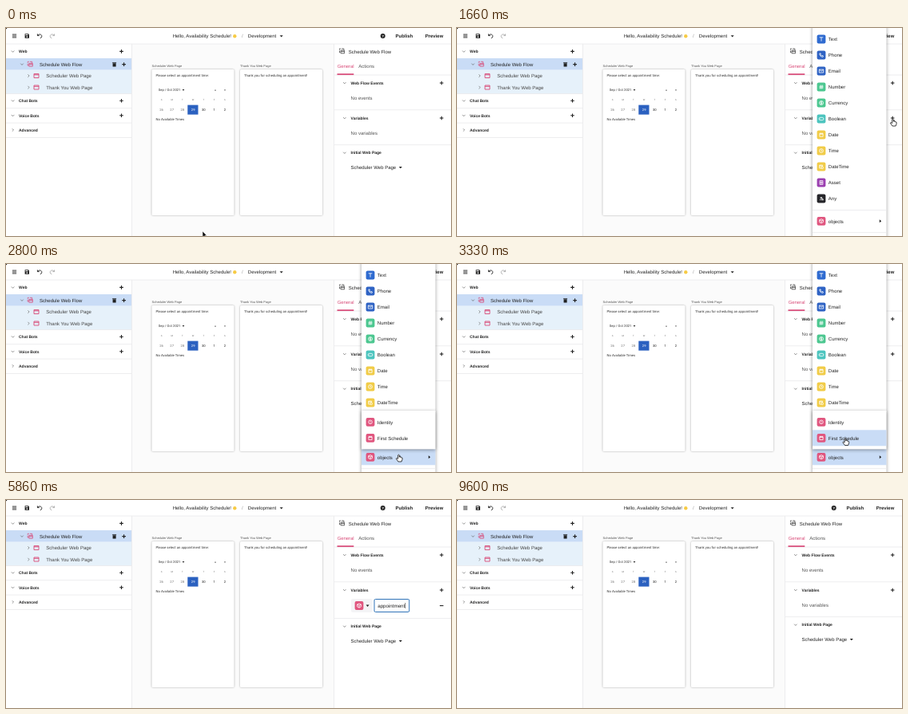
Write an HTML page that moves like this. It is 557 px wide and 261 px high and loops after 9860 ms.

```html
<!DOCTYPE html>
<html lang="en">
<head>
<meta charset="utf-8">
<title>Schedule editor</title>
<style>
html, body { margin: 0; width: 100%; height: 100%; overflow: hidden; background: #fff; }
svg { display: block; width: 100%; height: 100%; }
text { font-family: "Liberation Sans", Arial, sans-serif; text-rendering: geometricPrecision; white-space: pre; }
.page { font-family: Roboto, sans-serif; }
.card { filter: drop-shadow(0 .6px 1px #0005); }
.menu { filter: drop-shadow(0 1px 2px #0006); }
</style>
</head>
<body>
<svg viewBox="0 0 557 261"><g id="base"></g><g id="live"></g></svg>
<script>
const LOOP = 9860, INK = '#222', PINK = '#d94a78', BLUE = '#c9dcf6', LINE = '#e9e9ec', WORD = 'appointment';
const $ = id => document.getElementById(id);

// Drawing helpers: each returns SVG markup; text is centred vertically on y.
const text = (x, y, s, size = 6, fill = INK, more = '') =>
  `<text x="${x}" y="${y + size * .35}" font-size="${size}" fill="${fill}" ${more}>${s}</text>`;
const bold = (x, y, s, size = 5) => text(x, y, s, size, INK, 'font-weight="700"');
const rect = (x, y, w, h, fill, more = '') =>
  `<rect x="${x}" y="${y}" width="${w}" height="${h}" fill="${fill}" ${more}/>`;
const path = (x, y, d, stroke = INK, w = .9, fill = 'none') =>
  `<path transform="translate(${x} ${y})" d="${d}" stroke="${stroke}" stroke-width="${w}" fill="${fill}"/>`;
const plus = (x, y, c) => path(x, y, 'M-2.3 0H2.3M0-2.3V2.3', c, 1.1);
const minus = y => path(545.2, y, 'M-2.3 0H2.3', INK, 1.1);
const down = (x, y) => path(x, y, 'M-1.7-.9L0 .9L1.7-.9', '#666', .7);
const right = (x, y) => path(x, y, 'M-.8-1.7L.9 0L-.8 1.7', '#666', .7);
const drop = (x, y, r = 2) => path(x, y, `M${-r} ${-r / 2}H${r}L0 ${r / 2 + .3}Z`, 'none', 0, INK);
const rule = (x, y, w) => rect(x, y, w, .8, LINE);

// White symbols for the type icons, around the centre of a square.
const GLYPH = {
  text: 'M-2.3-2.2H2.3M0-2.2V2.6',
  phone: 'M-2.2-2C-2 .8-.6 2.2 2.1 2.3L2.4 1L1 .3L.3 1L-1-.4L-.4-1L-1.1-2.3Z',
  email: 'M-2.7-1.9H2.7V2H-2.7ZL0 .3L2.7-1.9',
  number: 'M-.7-2.5L-1.3 2.5M1.3-2.5L.7 2.5M-2.5-.8H2.5M-2.5 1H2.5',
  coin: 'M-2.5 0A2.5 2.5 0 1 1 2.5 0A2.5 2.5 0 1 1-2.5 0M.9-1Q-.9-1.5-.9-.5T.9.6Q.8 1.5-.9 1M0-1.9V1.9',
  toggle: 'M-1.2-1.7H1.2A1.7 1.7 0 0 1 1.2 1.7H-1.2A1.7 1.7 0 0 1-1.2-1.7M-1.6 0H-.8',
  date: 'M-2.1-1.6H2.1V2.3H-2.1ZM-2.1-.9H2.1M-1.1-2.5V-1.4M1.1-2.5V-1.4',
  time: 'M-2.4 0A2.4 2.4 0 1 1 2.4 0A2.4 2.4 0 1 1-2.4 0M0-1.4V.2H1.1',
  both: 'M.2 1.9H-2.3V-1.9H1.6V-.4M-2.3-.9H1.6M-.1 1.3A1.3 1.3 0 1 1 2.5 1.3A1.3 1.3 0 1 1-.1 1.3',
  asset: 'M-1.9-2.4H1.9V2.4H-1.9ZM-1-.9H1V.9H-1Z',
  any: 'M-2 1.6H-.6M.4 1.8L1.5-.2L2.5 1.8ZM-.9-1.5H.6V0H-.9Z',
  cube: 'M0-2.6L2.4-1.4V1.4L0 2.6L-2.4 1.4V-1.4ZM-2.4-1.4L0-.1L2.4-1.4M0-.1V2.6',
  who: 'M-2.3 0A2.3 2.3 0 1 1 2.3 0A2.3 2.3 0 1 1-2.3 0M0-1.2V.2M0 .8V1.3'
};
const icon = (x, y, color, glyph) =>
  rect(x - 5.4, y - 5.4, 10.8, 10.8, color, 'rx="2"') + path(x, y, GLYPH[glyph], '#fff', .8);

const flowIcon = (x, y, c) =>
  path(x, y, 'M-3-1.6V-3H-1.4M-.3-3H2.4V-1.4M-1.4-.9H3.1V2.8H-1.4ZM-1.4.4H3.1M-3-.6V1.8H-2.1', c, .8);
const pageIcon = y => path(38, y, 'M-3-2.5H3V2.5H-3ZM-3-1.2H3', PINK, .9);

function topBar() {
  return rect(0, 0, 557, 20, '#fff') + rule(0, 19.6, 557) +
    path(0, 0, 'M0 0H1.5L0 1.5Z', 'none', 0, '#000') +
    path(10.5, 10, 'M-2.6-1.9H2.6M-2.6 0H2.6M-2.6 1.9H2.6', INK, .9) +
    path(26.3, 10, 'M-2.7-2.7H1.7L2.7-1.7V2.7H-2.7Z', 'none', 0, INK) +
    rect(24.5, 8, 2.8, 1.2, '#fff') + `<circle cx="26.3" cy="11.1" r=".9" fill="#fff"/>` +
    path(42, 10, 'M-2.6-2.6V-.4H-.4M-2.5-.5C-.7-3 2.8-2.2 2.8.4Q2.7 2.2.8 2.8', INK, .9) +
    path(58, 10, 'M2.6-2.6V-.4H.4M2.5-.5C.7-3-2.8-2.2-2.8.4Q-2.7 2.2-.8 2.8', '#aaa', .9) +
    text(208.7, 10.2, 'Hello, Availability Schedule!') +
    `<circle cx="286.3" cy="10.2" r="2.2" fill="#f7cb45"/>` +
    text(295, 10.2, '/', 6, '#999') + text(302.8, 10.2, 'Development') + drop(344.7, 10.2) +
    `<circle cx="471.7" cy="10" r="3" fill="${INK}"/>` +
    text(471.7, 10.1, '?', 4.6, '#fff', 'text-anchor="middle" font-weight="700"') +
    bold(487.6, 10.2, 'Publish', 6) + bold(524.7, 10.2, 'Preview', 6);
}

function leftPanel() {
  const group = (y, s) => down(8.6, y) + bold(16, y, s) + plus(144.5, y);
  const page = (y, s) => right(28.2, y) + pageIcon(y) + text(50.3, y + .3, s, 6, '#444');
  return rect(0, 20, 157, 241, '#fff') + rect(157, 20, .8, 241, LINE) +
    rect(0, 38, 157, 14.7, BLUE) + rect(0, 52.7, 157, 29.5, '#e6f1fa') +
    [82, 100.3, 118.7, 137].map(y => rule(0, y, 157)).join('') +
    group(29.4, 'Web') + group(91.3, 'Chat Bots') + group(109.8, 'Voice Bots') +
    right(8.6, 128) + bold(16, 128.2, 'Advanced') +
    down(20, 45.5) + flowIcon(30.2, 45.3, PINK) + text(42, 45.6, 'Schedule Web Flow') +
    path(135.6, 45.7, 'M-1.8-1.3H1.8V2.6H-1.8ZM-2.3-2.3H2.3V-1.8H-2.3Z', INK, .4, INK) + plus(147.6, 45.6) +
    page(60, 'Scheduler Web Page') + page(74.5, 'Thank You Web Page');
}

function canvasArea() {
  const app = (x, y, s, size = 4.2, fill = '#333', more = '') => text(x, y, s, size, fill, 'class="page" ' + more);
  const card = (x, title, s) => text(x, 47.2, title, 4, '#555') +
    rect(x, 52, 103, 183, '#fff', 'rx="1.5" class="card"') + app(x + 5, 59.3, s, 4.25);
  const mid = 'text-anchor="middle"', day = i => 194.5 + i * 13.22;
  let out = card(182.5, 'Scheduler Web Page', 'Please select an appointment time:') +
    card(293, 'Thank You Web Page', 'Thank you for scheduling an appointment!') +
    app(190.7, 77.8, 'Sep / Oct 2021') + drop(222, 77.7, 1.4) +
    path(262, 78, 'M-1 .6L0-.7L1 .6Z', 'none', 0, INK) + path(274, 78, 'M-1-.6L0 .7L1-.6Z', 'none', 0, INK) +
    rect(227.3, 96.6, 13.2, 12, '#2b61c0') + app(187.5, 114.9, 'No Available Times');
  [...'SMTWTFS'].forEach((c, i) => out += app(day(i), 90.2, c, 2.9, '#777', mid));
  [26, 27, 28, 29, 30, 1, 2].forEach((n, i) =>
    out += app(day(i), 102.6, n, 4.2, i < 3 ? '#777' : i == 3 ? '#fff' : INK, mid));
  return out;
}

function rightPanel() {
  return rect(410, 20, 147, 241, '#fff') + rect(410, 20, .8, 241, LINE) +
    flowIcon(420.5, 29, '#444') + text(428.8, 29.8, 'Schedule Web Flow') +
    text(414.7, 48.2, 'General', 5.9, PINK) + text(441.3, 48.2, 'Actions', 6, '#555') +
    rule(411, 58.6, 146) + rect(414.5, 57.2, 20.8, 1.7, PINK) +
    down(423.8, 69) + bold(431.6, 69, 'Web Flow Events') + plus(545.2, 69) +
    text(431.6, 87.8, 'No events', 6, '#555') + rule(411, 102.4, 146) +
    down(423.8, 113) + bold(431.6, 113, 'Variables');
}

const sizer = document.createElement('canvas').getContext('2d');
sizer.font = '60px "Liberation Sans", Arial, sans-serif';
const typed = [[4730, 2], [4860, 4], [5000, 6], [5060, 8], [5200, 10], [5330, 11]];

function variables(t) {
  const hasRow = t >= 4000 && t < 8530, dy = hasRow ? 2 : 0;
  const hot = y => rect(539, y - 6.3, 12.6, 12.6, '#f5c6d3', 'rx="2"');
  const onPlus = t >= 800 && t < 1600;
  let out = (onPlus ? hot(113) : '') + plus(545.2, 113, onPlus ? PINK : INK);
  if (!hasRow) out += text(431.6, 131.7, 'No variables', 6, '#555');
  else {
    const editing = t < 6000;
    out += (t >= 8400 ? hot(132.6) : '') + minus(132.6) +
      rect(432, 124, editing ? 26.5 : 60, 17, '#f4f4f6', 'rx="2"') + icon(442, 132.5, '#e0567f', 'cube');
    if (editing) {
      const count = typed.reduce((n, [at, k]) => t >= at ? k : n, 0), s = WORD.slice(0, count);
      const w = sizer.measureText(s).width / 10 * 6.2 / 6;
      out += drop(452.6, 132.6) +
        rect(461, 124.5, Math.max(28, w + 9.6), 16, '#fff', 'rx="1.5" stroke="#2f73b8"') +
        text(465.2, 132.6, s, 6.2) + rect(465.4 + w, 129, .6, 7, INK);
    } else out += bold(450.7, 132.5, WORD, 6);
  }
  return out + rule(411, 146.3 + dy, 146) + down(423.8, 156.6 + dy) +
    bold(431.6, 156.7 + dy, 'Initial Web Page') +
    text(431.6, 175 + dy, 'Scheduler Web Page') + drop(493.8, 175 + dy);
}

const ITEMS = [
  ['Text', '#2f6bd0', 'text'], ['Phone', '#2f63c4', 'phone'], ['Email', '#2f63c4', 'email'],
  ['Number', '#4cc790', 'number'], ['Currency', '#4cc790', 'coin'], ['Boolean', '#4cc4be', 'toggle'],
  ['Date', '#f1cc48', 'date'], ['Time', '#f1cc48', 'time'], ['DateTime', '#f1cc48', 'both'],
  ['Asset', '#9b40b0', 'asset'], ['Any', '#26262a', 'any']
];
const item = (y, [s, color, glyph], bg) =>
  (bg ? rect(445, y - 10, 92.5, 20, bg) : '') + icon(456, y, color, glyph) + text(464.8, y + .2, s);

function menu(t) {
  if (t < 1600 || t >= 3600) return '';
  const sub = t >= 2800, hover = place(t - 200)[1];
  let out = rect(445, -4, 92.5, 270, '#fff', 'class="menu"');
  ITEMS.forEach((it, i) => {
    const y = 14 + i * 20;
    out += item(y, it, !sub && t > 1860 && Math.abs(hover - y) < 10 && '#e9f2fb');
  });
  out += rule(445, 228, 92.5) + rule(445, 256.3, 92.5) +
    item(242.3, ['objects', '#e0567f', 'cube'], sub ? BLUE : hover > 232 && '#e9f2fb') +
    path(529.8, 242.3, 'M-1-2L1.4 0L-1 2Z', 'none', 0, INK);
  if (sub) out += rect(445, 184, 92.5, 48.3, '#fff', 'class="menu"') +
    item(198.3, ['Identity', '#e0567f', 'who'], t > 2900 && hover < 208 && BLUE) +
    item(218.3, ['First Schedule', '#e0567f', 'date'], hover >= 208 && hover < 230 && BLUE);
  return out;
}

// Pointer tip: time, x, y
const TRACK = [
  [0, 246, 255], [60, 246, 255], [460, 484, 137], [660, 540, 109], [860, 545.5, 114], [1800, 545.5, 114],
  [2330, 497.5, 211.5], [2600, 493, 239], [2860, 491, 239], [3060, 486, 218.5], [3530, 486, 218.5],
  [3660, 481, 189], [3860, 473, 127], [6000, 503, 150], [6060, 503, 150], [6330, 517, 142],
  [6530, 517, 142], [6531, 512.5, 203.5], [7860, 512.5, 203.5], [8060, 542, 136], [8260, 545, 133],
  [9060, 545, 133], [9260, 543, 246]
];
function place(t) {
  const i = TRACK.findIndex(k => k[0] > t);
  if (i < 0) return TRACK.at(-1).slice(1);
  const [a, x, y] = TRACK[i - 1], [b, u, v] = TRACK[i], p = (t - a) / (b - a);
  return [x + (u - x) * p, y + (v - y) * p];
}
const within = (t, ...spans) => spans.some(([a, b]) => t >= a && t < b);

function pointer(t) {
  if (within(t, [4730, 6000], [6530, 7860], [9260, LOOP])) return '';
  if (within(t, [4000, 4730])) return path(474, 131, 'M-1.3-4H1.3M0-4V4M-1.3 4H1.3', INK, .7);
  const [x, y] = place(t);
  return within(t, [800, 3600], [8200, 8600])
    ? path(x, y, 'M-.8 .8Q0-.3.8.8V3.3Q2-.1+2.2 3.5Q3.4 2.8 3.5 4Q4.6 3.5 4.6 5V6.2L3.6 9H-.5L-3.2 5.2Q-3 3.8-.8 5.4Z', '#111', .8, '#fff')
    : path(x, y, 'M0 0V7.4L1.7 5.9L2.9 8.6L4.2 8L3 5.4H5.3Z', '#fff', .5, '#111');
}

const focusRing = t => within(t, [1260, 1600])
  ? rect(.6, 38.6, 155.8, 13.5, 'none', 'stroke="#2c62c4" stroke-width="1.2"') : '';

$('base').innerHTML = rect(0, 0, 557, 261, '#fbfbfb') + canvasArea() + leftPanel() + rightPanel() + topBar();

function frame(now) {
  const t = now % LOOP;
  $('live').innerHTML = focusRing(t) + variables(t) + menu(t) + pointer(t);
  requestAnimationFrame(frame);
}
frame(performance.now());
</script>
</body>
</html>
```
